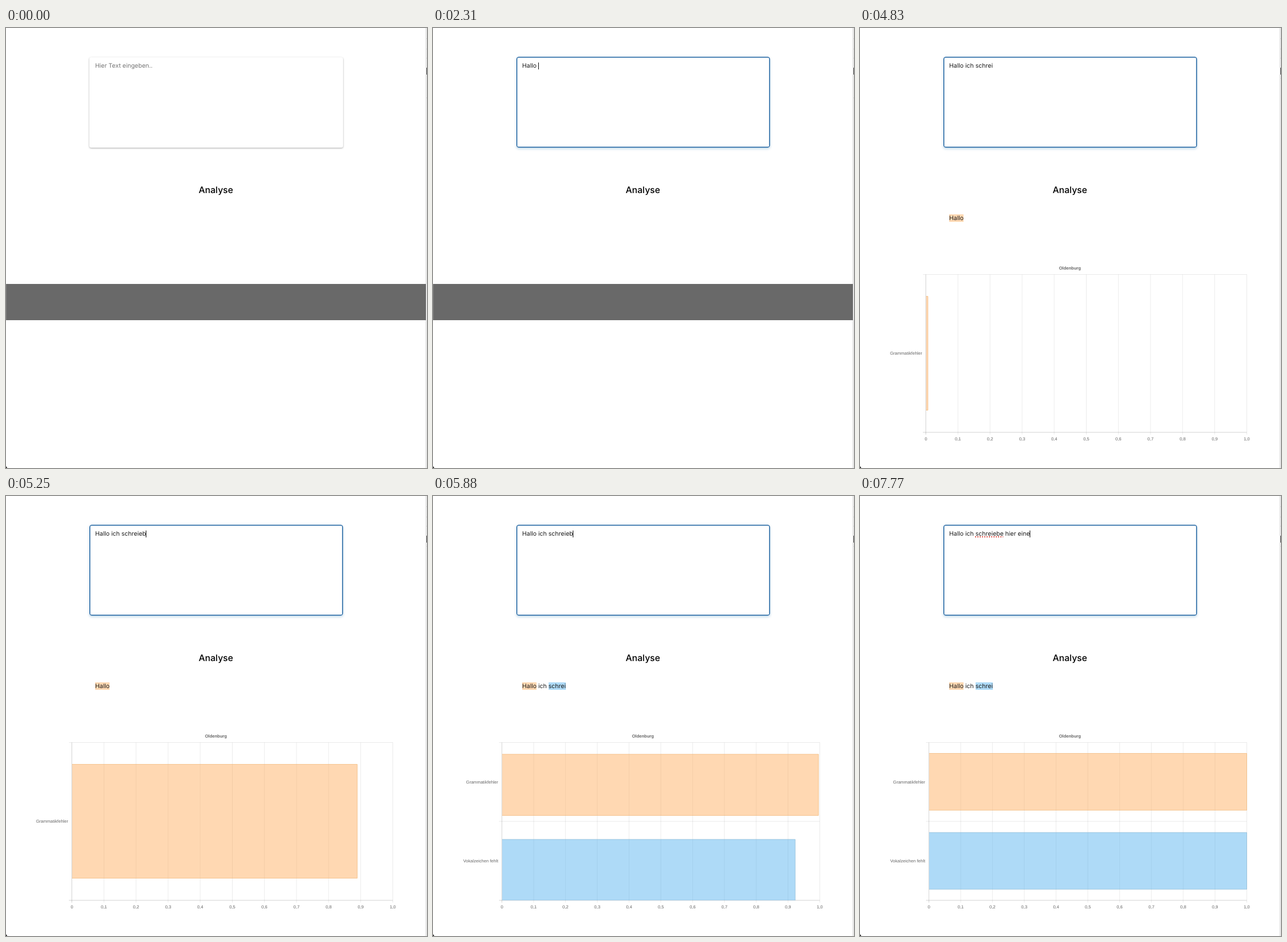
Animation, 732 px wide and 765 px high, one loop 8000 ms. Source, as an HTML page:

```html
<!DOCTYPE html>
<html lang="de">
<head>
<meta charset="utf-8">
<title>Textanalyse</title>
<style>
  html, body { margin: 0; width: 100%; height: 100%; overflow: hidden; background: #fff; }
  body { position: relative; text-rendering: geometricPrecision; }
  body > * { position: absolute; box-sizing: border-box; }
  .line {
    left: 155px; white-space: pre; color: #1c1c1c;
    font: 10.5px/14px Inter, "Open Sans", sans-serif;
  }
  #box {
    left: 145px; top: 51px; width: 441px; height: 157px; border-radius: 3px;
    box-shadow: 0 1px 3px rgba(0, 0, 0, .34);
  }
  #box.focus {
    top: 50px; height: 158px; border-radius: 4px; border: 1px solid #1d62a0;
    box-shadow: inset 0 0 0 .5px #1d62a0, 0 2px 4px rgba(36, 120, 180, .3);
  }
  #input { top: 59.2px; }
  #hint { top: 59.2px; color: #757575; }
  #caret { display: inline-block; width: 1px; height: 12px; margin-right: -1px; vertical-align: -2.5px; background: #111; }
  .typo { text-decoration: underline dotted #e0564c 1.5px; text-underline-offset: 1.2px; text-decoration-skip-ink: none; }
  h1 {
    left: 0; top: 272.3px; width: 730px; margin: 0; text-align: center; color: #000;
    font: 500 15.6px/20px Inter, "Open Sans", sans-serif;
  }
  #result { top: 323.5px; }
  mark { color: inherit; background: rgba(255, 159, 64, .4); }
  mark.vowel { background: rgba(54, 162, 235, .4); }
  #band { left: 0; top: 444.5px; width: 730px; height: 63px; background: #696969; border-left: 1px solid #7c7c7c; }
  #corner { left: 0; top: 760px; width: 3px; height: 5px; background: radial-gradient(ellipse 3px 5px at 100% 0, #fff 92%, #111); }
  .dot { top: 306px; width: 6px; height: 6px; border-radius: 50%; background: #999; }
  #edge { left: 730px; top: 0; width: 2px; height: 765px; border-left: 1px solid #c6c6c6; }
  #edge i { position: absolute; left: 0; width: 1px; height: 1px; background: #ddd; }
  #edge i.bar { height: 12px; background: #555; }
  svg { left: 0; top: 0; }
  svg text { font: 7.55px "Liberation Sans", Arial, sans-serif; fill: #666; }
  svg text.title { font-weight: bold; }
  .grid { stroke: rgba(0, 0, 0, .1); stroke-width: .8; }
  .axis { stroke: rgba(0, 0, 0, .22); stroke-width: .8; }
  .bar { stroke-width: .63; }
</style>
</head>
<body>
<div id="box"></div>
<div id="hint" class="line">Hier Text eingeben..</div>
<div id="input" class="line"><span id="typed"></span><span id="caret"></span></div>
<h1>Analyse</h1>
<div class="dot" style="left:353px"></div>
<div class="dot" style="left:362.5px"></div>
<div class="dot" style="left:372px"></div>
<div id="result" class="line"><mark>Hallo</mark><span id="more"> ich <mark class="vowel">schrei</mark></span></div>
<div id="band"></div>
<svg id="chart" width="732" height="765" viewBox="0 0 732 765">
  <defs><clipPath id="area"><rect x="110" y="428" width="563.5" height="275"/></clipPath></defs>
  <text class="title" x="365" y="419.7" text-anchor="middle">Oldenburg</text>
  <g id="single"></g>
  <g id="double"></g>
  <g clip-path="url(#area)">
    <path id="grammar" class="bar" fill="rgba(255,159,64,.4)" stroke="#efb26c"/>
    <path id="vowel" class="bar" fill="rgba(54,162,235,.4)" stroke="#83b4cf"/>
  </g>
</svg>
<div id="edge">
  <i style="top:18px"></i><i style="top:36px"></i><i style="top:52px"></i>
  <i class="bar" style="top:69px"></i><i id="notch"></i>
</div>
<div id="corner"></div>
<script>
  const LOOP = 8000, STEP = 70;
  const TOP = 428.5, BOTTOM = 703, RIGHT = 672.5;
  const RESULT_AT = 4760, GROW_AT = 4828.4, SPLIT_AT = 5460;
  const $ = id => document.getElementById(id);
  const show = (el, on) => { el.style.display = on ? "" : "none"; };
  const clamp = v => Math.min(1, Math.max(0, v));
  const easeOutQuart = p => 1 - (1 - clamp(p)) ** 4;
  const mix = (a, b, k) => a + (b - a) * k;

  // Time of each key press; "<" deletes one character.
  const keys = [
    [1400, "H"], [1540, "a"], [1680, "l"], [1890, "l"], [2100, "o"], [2310, " "],
    [2940, "i"], [3010, "c"], [3150, "h"], [3290, " "],
    [3430, "s"], [3500, "c"], [3640, "h"], [3710, "r"], [3850, "e"], [4060, "i"],
    [4970, "e"], [5180, "b"], [5460, "e"], [5740, "<"], [6090, "e"], [6510, " "],
    [6790, "h"], [7000, "i"], [7070, "e"], [7140, "r"], [7210, " "],
    [7350, "e"], [7490, "i"], [7630, "n"], [7770, "e"]
  ];

  function drawAxes(group, left, labels) {
    const rows = labels.length;
    const line = (x1, y1, x2, y2, cls = "grid") =>
      `<line class="${cls}" x1="${x1}" y1="${y1}" x2="${x2}" y2="${y2}"/>`;
    let out = "";
    for (let i = 0; i <= 10; i++) {
      const x = mix(left, RIGHT, i / 10);
      const label = i ? (i / 10).toFixed(1).replace(".", ",") : "0";
      out += line(x, TOP, x, BOTTOM + 4, i ? "grid" : "axis");
      out += `<text x="${x}" y="717.2" text-anchor="middle">${label}</text>`;
    }
    for (let i = 0; i <= rows; i++) {
      const y = mix(TOP, BOTTOM, i / rows);
      out += line(left - 5, y, RIGHT, y, i === rows ? "axis" : "grid");
    }
    labels.forEach((label, i) => {
      const y = mix(TOP, BOTTOM, (i + .5) / rows) + 2.6;
      out += `<text x="${left - 6.5}" y="${y}" text-anchor="end">${label}</text>`;
    });
    group.innerHTML = out;
  }

  // The bar starts just right of the axis line.
  function drawBar(el, left, value, top, bottom) {
    const x = mix(left, RIGHT, value), start = left + .4;
    el.setAttribute("d", `M${start} ${top}H${Math.max(x, start)}V${bottom}H${start}`);
  }

  function drawInput(t) {
    let text = "", last = 480;
    for (const [at, key] of keys) {
      if (at > t) break;
      text = key === "<" ? text.slice(0, -1) : text + key;
      last = at;
    }
    $("typed").innerHTML = t >= 6510 ? text.replace("schreiebe", '<span class="typo">$&</span>') : text;
    show($("hint"), !text);
    show($("caret"), t >= last && (t - last) % 1000 < 500);
    $("box").className = t >= 490 ? "focus" : "";
  }

  function drawChart(t) {
    const split = t >= SPLIT_AT;
    show($("chart"), t >= RESULT_AT);
    show($("single"), !split);
    show($("double"), split);
    show($("vowel"), split);
    show($("grammar"), t >= GROW_AT);
    const grow = at => easeOutQuart((at - GROW_AT) / 996);
    if (!split) {
      drawBar($("grammar"), 114.5, grow(t), 466.5, 664.5);
      return;
    }
    const start = 5348, k = easeOutQuart((t - start) / 1125);
    drawBar($("grammar"), 119.8, mix(grow(start), 1, k), mix(466.5, 447.5, k), mix(664.5, 546.3, k));
    drawBar($("vowel"), 119.8, k, mix(741, 585, k), mix(939, 683.8, k));
  }

  function render(time) {
    const t = Math.floor(time % LOOP / STEP) * STEP;
    drawInput(t);
    drawChart(t);
    show($("result"), t >= RESULT_AT);
    show($("more"), t >= SPLIT_AT);
    show($("band"), t < RESULT_AT);
    $("notch").style.top = (t < 2940 ? 121 : 87) + "px";
    document.querySelectorAll(".dot").forEach((dot, i) => {
      const p = clamp((t - 3010 - i * 420) / 420);
      dot.style.opacity = Math.sin(p * Math.PI);
    });
  }

  drawAxes($("single"), 114.5, ["Grammatikfehler"]);
  drawAxes($("double"), 119.8, ["Grammatikfehler", "Vokalzeichen fehlt"]);
  const begin = performance.now();
  function tick() {
    render(performance.now() - begin);
    requestAnimationFrame(tick);
  }
  tick();
</script>
</body>
</html>
```
